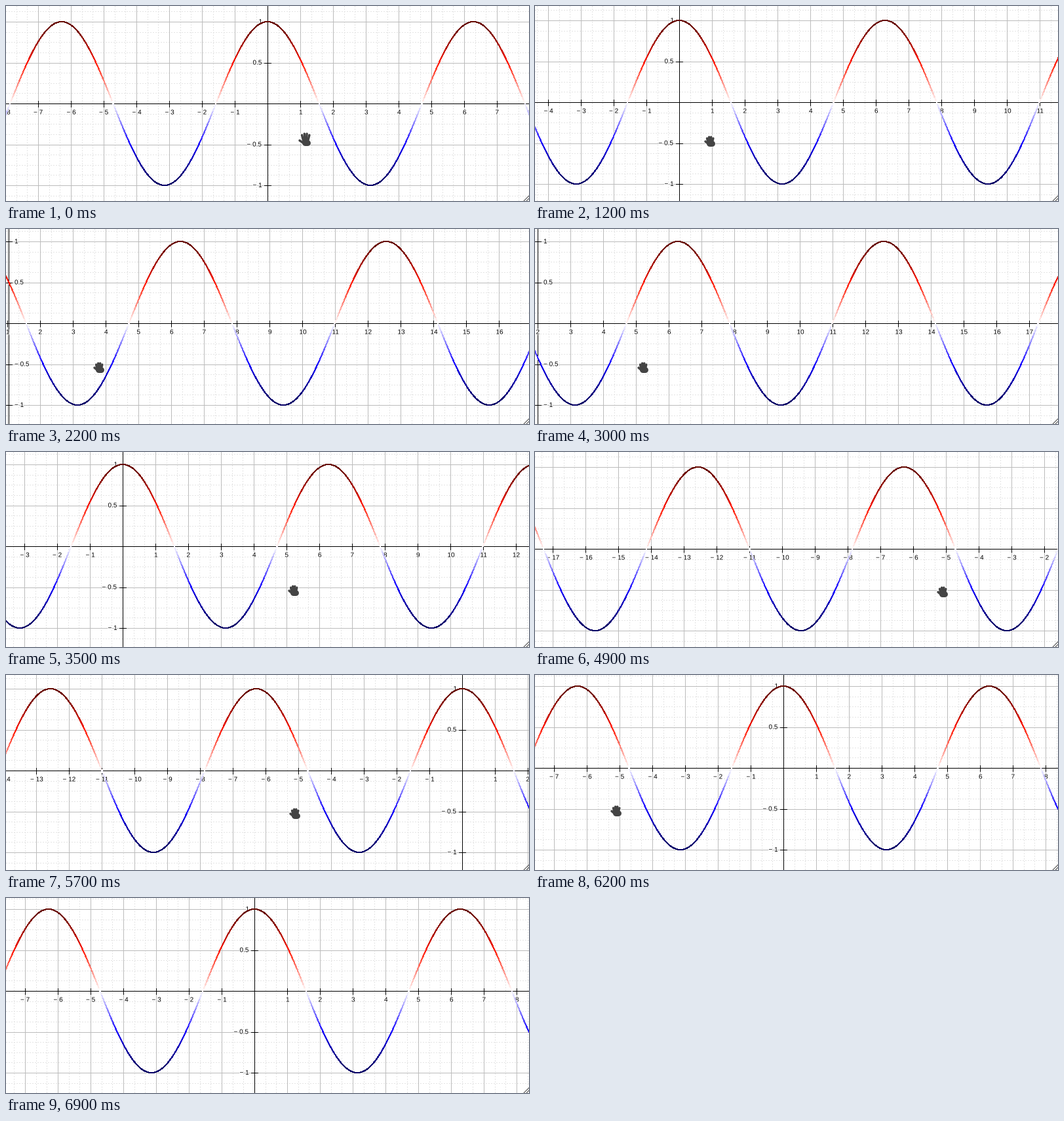
A matplotlib script that plays this animation: 798 px wide and 298 px high, repeating every 8300 ms.

```python
import colorsys
import numpy as np
import matplotlib.pyplot as plt
from matplotlib.animation import FuncAnimation
from matplotlib.collections import LineCollection
from matplotlib.colors import ListedColormap
from matplotlib.patheffects import withStroke

plt.rcParams["text.hinting_factor"] = 1

W, H = 798, 298
PX = 0.72                # one pixel in points at 100 dpi
UX, UY = 50, 125         # pixels per unit
FRAMES, STEP = 83, 100
EDGE = 4                 # the y axis sticks here when scrolled off the left

HOME = np.array([399, 149])
REST, REST_END = np.array([456, 205]), 3
EXIT, EXIT_END = np.array([60, 330]), 69
REACH = 5                # longest glide of the open hand, in steps

# first step, last step, grab point, pull
DRAGS = [
    (4, 13, (445, 208), (-185.4, -2)),
    (16, 24, (402.6, 214), (-309.6, -3)),
    (30, 36, (164, 211), (296, 0)),
    (39, 42, (18, 205), (288, 0)),
    (45, 50, (232, 209), (434.7, 5)),
    (53, 62, (666.7, 214), (-543.7, -7)),
]


def glide(i, begin, end, a, b):
    begin = max(begin, end - REACH)
    u = np.clip((i - begin) / (end - begin), 0, 1)
    return a + (1 - (1 - u) ** 2) * (b - a)


def pose(i):
    """Hand position, plot origin and whether the hand is gripping."""
    hand, origin, free = REST, HOME, REST_END
    for start, end, grab, pull in DRAGS:
        grab = np.array(grab)
        if i < start:
            return glide(i, free, start, hand, grab), origin, False
        u = min((i - start) / (end - start), 1)
        shift = u * u * (3 - 2 * u) * np.array(pull)
        hand, origin, free = grab + shift, origin + shift, end
        if i <= end:
            return hand, origin, True
    return glide(i, free, EXIT_END, hand, EXIT), origin, False


def shade(v):
    hue = 5 / 360 if v > 0 else 244 / 360
    return colorsys.hls_to_rgb(hue, 1 - abs(v) + 0.2 * v ** 4, 1)


ramp = ListedColormap([shade(v) for v in np.linspace(-1, 1, 129)])

fig = plt.figure(figsize=(W / 100, H / 100), dpi=100, facecolor="white")
ax = fig.add_axes([0, 0, 1, 1])
ax.set_xlim(0, W)
ax.set_ylim(H, 0)
ax.axis("off")


def lines(z, **kw):
    return ax.add_collection(
        LineCollection([], linewidths=PX, zorder=z, snap=False, **kw),
        autolim=False)


minor = lines(1, colors="#e4e4e4", linestyles=(0, (2, 2)))
major = lines(2, colors="#bcbcbc")
axes = lines(3, colors="black")
curve = lines(5, cmap=ramp, antialiaseds=False)
curve.set_clim(-1, 1)


def label(value):
    text = f"{abs(value):g}"
    return ax.text(0, 0, "\u2212 " + text if value < 0 else text,
                   family="Liberation Sans", size=10 * PX, va="center",
                   ha="center", zorder=4, clip_on=True,
                   path_effects=[withStroke(linewidth=2 * PX,
                                            foreground="white")])


x_labels = {n: label(n) for n in range(-20, 20) if n}
y_labels = {v: label(v) for v in (-1, -0.5, 0.5, 1)}

# resize grip
for d in (8, 4):
    ax.plot([W - d, W], [H, H - d], color="#444444", lw=PX, zorder=6)


def make_hand(length, spread, thumb):
    """Four fanned fingers, a thumb and a palm as round strokes."""
    strokes = [([(1.2 + 2.3 * k, 1),
                 (1.2 + (2.3 + spread) * k, k * k - length)], 3.5)
               for k in np.arange(4) - 1.5]
    strokes.append(([(0, 6), thumb], 3.5))
    strokes.append(([(-0.5, 3.5), (3.5, 3.5)], 9))
    parts = []
    for color, grow, z in (("white", 2.6, 7), ("#444444", 0, 8)):
        for pts, width in strokes:
            line, = ax.plot([], [], color=color, lw=(width + grow) * PX,
                            solid_capstyle="round", zorder=z)
            parts.append((line, np.array(pts)))
    return parts


def place_hand(parts, x, y, shown):
    for line, pts in parts:
        line.set_data(pts[:, 0] + x, pts[:, 1] + y)
        line.set_visible(shown)


open_hand = make_hand(10, 1.5, (-8, 0.5))
fist = make_hand(6, 0.8, (-6, 1))


def vline(x, a=0, b=H):
    x = np.floor(x + 0.5) + 0.5
    return [(x, a), (x, b)]


def hline(y, a=0, b=W):
    y = np.floor(y + 0.5) + 0.5
    return [(a, y), (b, y)]


def update(i):
    hand, origin, grip = pose(i)
    hx, hy = np.round(hand)
    ox, oy = np.round(origin)
    axis_x = max(ox, EDGE)

    cols, rows = range(-60, 60), range(-10, 11)
    minor.set_segments(
        [vline(ox + k * UX / 3) for k in cols if k % 3]
        + [hline(oy + k * UY / 8) for k in rows if k % 4])
    major.set_segments(
        [vline(ox + k * UX / 3) for k in cols if k % 3 == 0]
        + [hline(oy + k * UY / 8) for k in rows if k % 4 == 0])

    marks = [vline(axis_x), hline(oy)]
    for n, text in x_labels.items():
        x = ox + n * UX
        text.set_position((x + 0.5, oy + 13.5))
        text.set_visible(-12 < x < W + 12)
        marks.append(vline(x, oy - 4, oy + 6))
    side, gap = ("left", 9) if ox < EDGE else ("right", -8.5)
    for v, text in y_labels.items():
        y = oy - v * UY
        text.set_ha(side)
        text.set_position((axis_x + gap, y))
        marks.append(hline(y, axis_x - 5, axis_x + 6))
    axes.set_segments(marks)

    x = np.arange(-2, W + 4, 2.0)
    value = np.cos((x - ox) / UX)
    pts = np.column_stack([x, oy - UY * value])
    curve.set_segments(np.stack([pts[:-1], pts[1:]], axis=1))
    curve.set_array((value[:-1] + value[1:]) / 2)

    shown = i < EXIT_END
    place_hand(open_hand, hx, hy, shown and not grip)
    place_hand(fist, hx, hy, shown and grip)
    return []


anim = FuncAnimation(fig, update, frames=FRAMES, interval=STEP,
                     init_func=lambda: [], repeat=True, repeat_delay=0)
plt.show()
```
